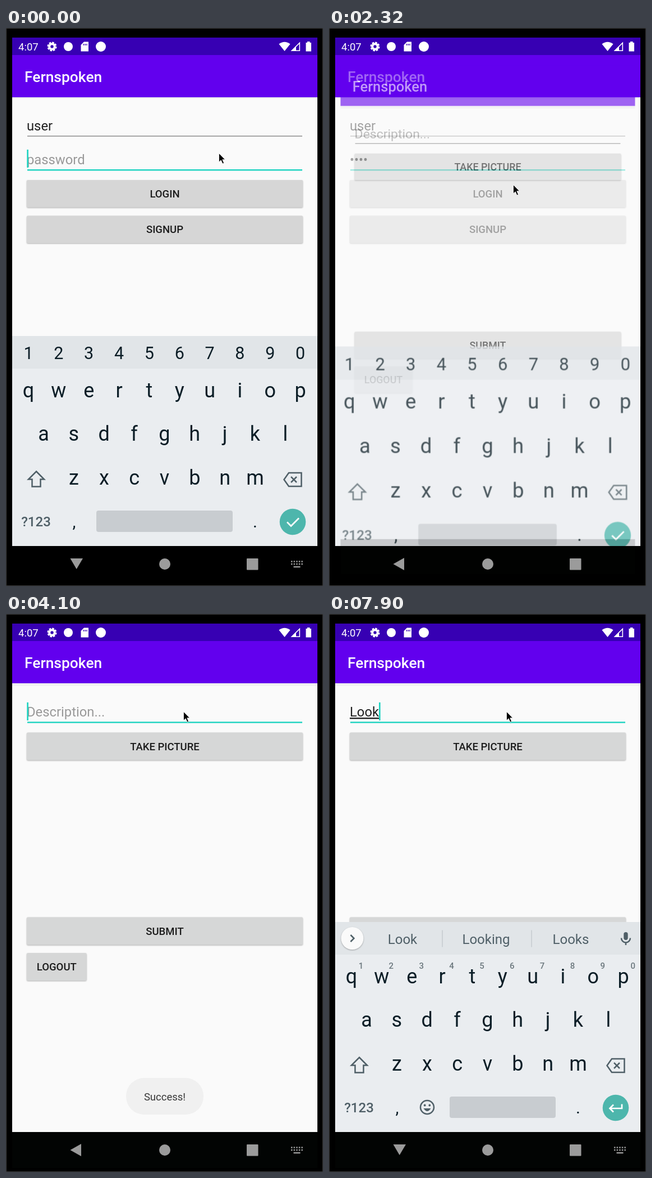
Animation of 565x991 px, one loop 8000 ms. Source, as an HTML page:

```html
<!DOCTYPE html>
<html lang="en">
<head>
<meta charset="utf-8">
<style>
  html, body { margin: 0; width: 100%; height: 100%; overflow: hidden; background: #000; }
  svg { display: block; font-family: Roboto, sans-serif; }
  .button { filter: drop-shadow(0 1px 1px rgba(0, 0, 0, .3)); }
  .line { fill: none; stroke: #4f5f67; stroke-width: 2.5; }
</style>
</head>
<body>
<svg id="stage" width="565" height="991" viewBox="0 0 565 991"></svg>
<script>
const LOOP = 8000, PITCH = 53.85;
const TEAL = '#1dd3c0', INK = '#0b1d26', SLATE = '#4f5f67';

const rect = (x, y, w, h, fill, extra = '') =>
  `<rect x="${x}" y="${y}" width="${w}" height="${h}" fill="${fill}" ${extra}/>`;
const circle = (x, y, r, fill, extra = '') =>
  `<circle cx="${x}" cy="${y}" r="${r}" fill="${fill}" ${extra}/>`;
const path = (d, extra = 'class="line"') => `<path d="${d}" ${extra}/>`;
const text = (x, y, s, size, fill, extra = '') =>
  `<text x="${x}" y="${y}" font-size="${size}" fill="${fill}" ${extra}>${s}</text>`;
const label = (x, y, s, size, fill, weight = 400) =>
  text(x, y, s, size, fill, `text-anchor="middle" font-weight="${weight}"`);
const group = (id, body) => `<g id="${id}">${body}</g>`;
const button = (x, y, w, h, s, fill) =>
  rect(x, y, w, h, fill, 'rx="2" class="button"') +
  label(x + w / 2, y + h / 2 + 6.6, s, 18.5, '#1c1c1c', 500);
const keys = (s, x, y, size, fill, weight) =>
  [...s].map((c, i) => label(x + i * PITCH, y, c, size, fill, weight)).join('');

const appBar = rect(11, 48, 544, 75, '#6200ee') +
  text(33, 96, 'Fernspoken', 26.4, '#fff', 'font-weight="500"');

const statusIcons = text(22, 40, '4:07', 18.5, '#fff') +
  circle(82, 33, 4.7, 'none', 'stroke="#fff" stroke-width="4"') +
  circle(82, 33, 7.2, 'none', 'stroke="#fff" stroke-width="2.6" stroke-dasharray="3.6 2.05"') +
  circle(111, 33, 8, '#fff') +
  path('M139 24.5H147V41.5H133.5V30Z', 'fill="#fff"') +
  path('M138.5 28v3M141.3 28v3M144 28v3', 'stroke="#3700b3" stroke-width="1.3"') +
  circle(169, 33, 9, '#fff') +
  path('M486.5 28.5Q496.5 21 506.5 28.5L496.5 41Z', 'fill="#fff"') +
  path('M509.5 40.2H523.3V26.4Z', 'fill="none" stroke="#fff" stroke-width="1.6"') +
  path('M508 41L517 32V41Z', 'fill="#fff"') +
  path('M534.5 26H537V24H541.5V26H544V41.5H534.5Z', 'fill="#fff"');

const login = rect(11, 123, 544, 797, '#fafafa') + appBar +
  rect(11, 123, 544, 2, '#e9e9ec') +
  text(37, 182, 'user', 23.8, '#212121') +
  rect(38, 191.3, 490, 1.4, '#858585') + rect(38, 251, 490, 2.4, TEAL) +
  text(37, 241.5, '', 23.8, '#999', 'id="password"') +
  button(37, 270, 492, 48.5, 'LOGIN', '#d6d6d6') +
  rect(37, 270, 492, 48.5, '#000', 'id="press" rx="2"') +
  button(37, 333.5, 492, 48.5, 'SIGNUP', '#d6d6d6');

const post = rect(11, 123, 544, 797, '#fafafa') + rect(11, 920, 544, 64, '#020403') + appBar +
  rect(11, 123, 544, 4.5, '#f0f0f1') +
  text(37, 182, '', 23.8, '#999', 'id="description"') +
  rect(38, 191.3, 490, 1.4, '#858585', 'id="underline"') +
  button(37, 210.5, 492, 49, 'TAKE PICTURE', '#d6d7d7') +
  button(37, 538.5, 492, 49, 'SUBMIT', '#d6d7d7') +
  button(37, 602, 106.5, 49, 'LOGOUT', '#d6d7d7');

const mic = rect(525.3, 565, 7.4, 14, SLATE, 'rx="3.7"') +
  path('M521 575.5a8 8 0 0 0 16 0M529 583v5');
const divider = x => rect(x, 561.5, 1.4, 30, '#c3c9cd');
const chevron = d => circle(41.5, 576, 20, '#fafafa', 'class="button"') + path(d);

const tools = chevron('M45 570L39 576L45 582') +
  circle(112.5, 573, 6.8, 'none', 'class="line"') + path('M117.5 578L125.5 586') +
  path('M187 566.5H201Q203.7 566.5 203.7 569V579L196.5 586H187Q184.5 586 184.5 583.5V569Q184.5 566.5 187 566.5ZM203 579H197V586M189 576.5Q194 582 199 576.5') +
  circle(190.5, 572.5, 1.5, SLATE) + circle(197.5, 572.5, 1.5, SLATE) +
  label(273, 582.5, 'GIF', 18.5, SLATE, 900) +
  rect(343, 566, 22, 22, SLATE, 'rx="1"') + divider(401) +
  [443, 451, 459].map(x => circle(x, 576, 2.7, SLATE)).join('') + mic;

const suggestions = chevron('M38.5 570L44.5 576L38.5 582') + divider(201.3) + divider(360.3) +
  ['Look', 'Looking', 'Looks'].map((s, i) => label([131, 280, 431][i], 585.5, s, 24, SLATE)).join('') + mic;

const keyboard = rect(11, 547, 544, 373, '#eaedf0') + rect(11, 547, 544, 58, '#e1e5e8') +
  keys('qwertyuiop', 40, 655.5, 36, INK) +
  keys('asdfghjkl', 67, 733, 36, INK) +
  keys('zxcvbnm', 121, 811, 36, INK) +
  path('M54 787.5L68 801.5H61.5V814.5H46.5V801.5H40Z') +
  path('M504 790H526.5V814H504L495.5 802ZM508 797L518 807M518 797L508 807') +
  label(53.5, 885, '?123', 24, SLATE, 500) +
  label(121.5, 887, ',', 30, INK) + label(444, 887, '.', 30, INK) +
  circle(511, 877, 23.3, '#4db6ac') +
  group('numeric', keys('1234567890', 40, 588, 30.5, INK) +
    rect(161, 857, 243, 38, '#c8ccd0', 'rx="4"') +
    path('M501 877.5L508 884.5L522 870.5', 'fill="none" stroke="#fff" stroke-width="2.7"')) +
  group('full', keys('1234567890', 57, 629.5, 15, '#6b777d', 500) +
    rect(215, 857, 189, 38, '#c8ccd0', 'rx="4"') +
    circle(175, 876, 12, 'none', 'class="line"') +
    circle(170.7, 872.5, 1.9, SLATE) + circle(179.3, 872.5, 1.9, SLATE) +
    path('M168.5 878Q175 888 181.5 878Z', `fill="${SLATE}"`) +
    path('M522 870.5V878H501M507 871.5L500.5 878L507 884.5', 'fill="none" stroke="#fff" stroke-width="2.7"') +
    group('tools', tools) + group('suggestions', suggestions));

const nav = path('', 'id="back" fill="#9b9b9b"') + circle(283, 952, 10, '#9b9b9b') +
  rect(429, 942, 20.5, 20.5, '#9b9b9b', 'rx="1"') +
  path('M508 947.5H529M508 952H529', 'class="ime" stroke="#9b9b9b" stroke-width="2.4" stroke-dasharray="2.5 2.1"') +
  path('M512.5 957H524.5', 'class="ime" stroke="#9b9b9b" stroke-width="2.4"');

const stage = document.getElementById('stage');
stage.innerHTML = '<clipPath id="screen"><rect x="11" y="17" width="544" height="903"/></clipPath>' +
  rect(0, 0, 565, 991, '#000') +
  rect(.5, .5, 564, 990, 'none', 'stroke="#3c3c3c"') +
  rect(11, 17, 544, 34, '#3700b3') +
  group('login', login) +
  rect(11, 104, 544, 836, '#fafafa', 'id="backdrop"') +
  group('post', post) + statusIcons +
  rect(0, 0, 2.6, 32, TEAL, 'id="caret"') +
  `<g clip-path="url(#screen)">${group('keyboard', keyboard)}</g>` +
  group('toast', rect(214, 824, 138, 65, '#f0f0f0', 'rx="32"') + label(283, 863.5, 'Success!', 18.5, '#383838')) +
  nav +
  path('M0 0V15.5L3.7 12.2L6.5 18.6L9 17.4L6.3 11.2H11Z', 'id="pointer" fill="#000" stroke="#fff" stroke-width=".8"');

const $ = id => document.getElementById(id);
const set = (id, attrs) => { for (const k in attrs) $(id).setAttribute(k, attrs[k]); };
const show = (id, on) => set(id, { opacity: +on });
// Holds each value until the next time: at(t, first, time, value, time, value, ...)
const at = (t, value, ...steps) => {
  for (let i = 0; i < steps.length && t >= steps[i]; i += 2) value = steps[i + 1];
  return value;
};
const zoom = (s, y, dy = 0) => `translate(283 ${y + dy}) scale(${s}) translate(-283 ${-y})`;

function draw(t) {
  const posting = t >= 2320, focused = t >= 3670, second = t >= 4100;

  const dots = at(t, 0, 120, 2, 270, 3, 420, 4);
  $('password').textContent = dots ? '•'.repeat(dots) : 'password';
  set('password', { fill: dots ? '#212121' : '#999' });
  show('press', at(t, 0, 1660, .12, 1790, .07, 1920, 0));

  set('post', {
    opacity: at(t, 0, 2320, .6, 2470, 1),
    transform: zoom(at(t, 1, 2320, .965, 2470, .9965, 2590, 1), 570)
  });
  show('login', t < 2470);
  show('backdrop', t >= 2470 && t < 2590);

  const typed = 'Look'.slice(0, at(t, 0, 7620, 2, 7760, 3, 7900, 4));
  $('description').textContent = typed || 'Description...';
  set('description', { fill: typed ? '#212121' : '#999', 'text-decoration': typed ? 'underline' : 'none' });
  set('underline', focused ? { fill: TEAL, height: 2.4 } : { fill: '#858585', height: 1.4 });

  const caretX = posting ? (typed ? 37 + $('description').getComputedTextLength() : 37.3)
    : 37.3 + dots * 8.1;
  set('caret', {
    x: caretX, y: posting ? 157 : 216,
    opacity: at(t, 1, 980, 0, 1370, 1, 1920, 0, 3670, 1, 4240, 0, 4830, 1, 5420, 0,
      5820, 1, 6350, 0, 6910, 1, 7470, 0, 7620, 1)
  });

  set('keyboard', {
    opacity: at(t, 1, 2320, .75, 2470, .05, 2590, 0, 4240, .65, 4390, 1),
    transform: zoom(at(t, 1, 2320, 1.015, 2470, 1.049, 2590, 1), 495, at(t, 0, 2320, 18, 2470, 75, 2590, 0, 4240, 40, 4390, 0))
  });
  show('numeric', !second);
  show('full', second);
  show('tools', !typed);
  show('suggestions', typed);
  show('toast', at(t, 0, 2470, .72, 2590, .95, 2740, 1, 4240, .85, 4390, .2, 4540, 0));

  const down = t < 2320 || t >= 4240;
  set('back', { d: down ? 'M114.5 942H137L125.7 961Z' : 'M134 941V963L114.5 952Z' });
  for (const e of stage.querySelectorAll('.ime')) e.setAttribute('opacity', +(t < 2320 || second));

  const a = at(t, 0, 980, .2, 1110, .55, 1240, .87, 1370, 1);
  const b = at(t, 0, 3140, .25, 3320, .7, 3490, 1);
  set('pointer', { transform: `translate(${379.5 - 51 * a - 12 * b} ${222.5 + 56 * a - 105 * b})` });
}

function tick() {
  draw(performance.now() % LOOP);
  requestAnimationFrame(tick);
}
tick();
</script>
</body>
</html>
```
